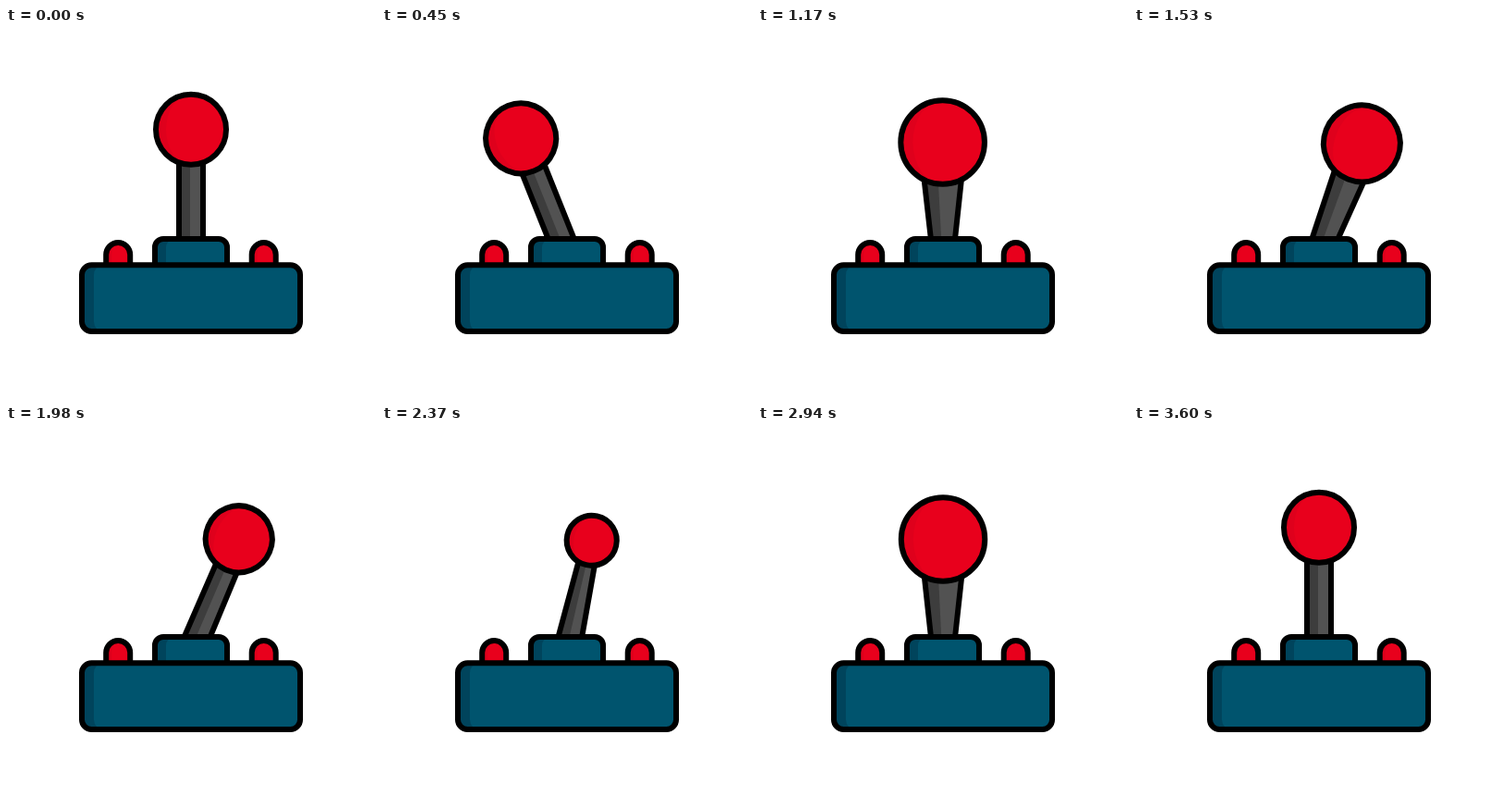
An HTML page without scripts that plays this animation: 400x400 px, repeating every 5630 ms.

```html
<!DOCTYPE html>
<html lang="en">
<head>
<meta charset="utf-8">
<title>Joystick</title>
<style>
  :root {
    --in: cubic-bezier(.47, 0, .745, .715);
    --out: cubic-bezier(.333, .667, .667, 1);
    --sine: cubic-bezier(.37, 0, .63, 1);
  }
  html, body { margin: 0; width: 100%; height: 100%; overflow: hidden; background: #fff; }
  svg { display: block; width: 100%; height: 100%; }

  .line { fill: none; stroke: #000; stroke-width: 6; stroke-linejoin: round; vector-effect: non-scaling-stroke; }
  .red { fill: #e8001c; }
  .red-dark { fill: #df001c; }
  .blue { fill: #00546e; }
  .blue-dark { fill: #00445c; }
  .grey { fill: #525252; }
  .grey-dark { fill: #3d3d3d; }

  .lever, .ball, .rod, .rod-shade {
    animation: 5630ms var(--sine) infinite;
    transform-origin: 0 0;
  }
  .lever { animation-name: tilt; }
  .ball { animation-name: reach, zoom; }
  .rod { animation-name: rod; }
  .rod-shade { animation-name: rod-shade; }

  /* left, sweep to the right, then settle upright */
  @keyframes tilt {
    0% { rotate: 0deg; }
    10.12% { rotate: -24.3deg; }
    10.66% { rotate: -24.3deg; animation-timing-function: var(--in); }
    22.08% { rotate: 0deg; animation-timing-function: var(--out); }
    30.91%, 31.97% { rotate: 24.5deg; }
    52.58%, 100% { rotate: 0deg; }
  }
  /* depth: near, level, far, near, level */
  @keyframes reach {
    0%, 10.66%, 32.3%, 47.96%, 63.94%, 100% { translate: 0 -134px; }
    21.6%, 53.29% { translate: 0 -120px; }
    42.63% { translate: 0 -122.8px; }
  }
  @keyframes zoom {
    0%, 10.66%, 32.3%, 63.94%, 100% { scale: 1; }
    21.6%, 53.29% { scale: 1.195; }
    42.63% { scale: .71; animation-timing-function: var(--in); }
    47.96% { scale: 1; animation-timing-function: var(--out); }
  }
  @keyframes rod {
    0%, 10.66%, 32.3%, 63.94%, 100% { d: path("M-13 0L-13 -118L13 -118L13 0Z"); }
    21.6%, 53.29% { d: path("M-11.3 0L-24.5 -118L24.5 -118L11.3 0Z"); }
    42.63% { d: path("M-13.2 0L-8 -118L8 -118L13.2 0Z"); animation-timing-function: var(--in); }
    47.96% { d: path("M-13 0L-13 -118L13 -118L13 0Z"); animation-timing-function: var(--out); }
  }
  @keyframes rod-shade {
    0%, 10.66%, 32.3%, 63.94%, 100% { d: path("M-13 0L-13 -118L-1 -118L-1 0Z"); }
    21.6%, 53.29% { d: path("M-11.3 0L-24.5 -118L-7 -118L-1 0Z"); }
    42.63% { d: path("M-13.2 0L-8 -118L0 -118L-1 0Z"); animation-timing-function: var(--in); }
    47.96% { d: path("M-13 0L-13 -118L-1 -118L-1 0Z"); animation-timing-function: var(--out); }
  }
</style>
</head>
<body>
<svg viewBox="0 0 400 400">
  <defs>
    <g id="button">
      <path class="red" d="M-13 256V245a13 13 0 0 1 26 0V256Z"/>
      <path class="red-dark" d="M-13 256V245A13 13 0 0 1 0 232Q-7 236 -7 245V256Z"/>
      <path class="line" d="M-13 256V245a13 13 0 0 1 26 0V256"/>
    </g>
  </defs>

  <g transform="translate(200 243.7)">
    <g class="lever">
      <path class="rod grey" d="M-13 0L-13 -118L13 -118L13 0Z"/>
      <path class="rod-shade grey-dark" d="M-13 0L-13 -118L-1 -118L-1 0Z"/>
      <path class="rod line" d="M-13 0L-13 -118L13 -118L13 0Z"/>
      <g class="ball">
        <circle class="red" r="38"/>
        <path class="red-dark" d="M0 -38A38 38 0 0 0 0 38A27 38 0 0 1 0 -38Z"/>
        <circle class="line" r="38"/>
      </g>
    </g>
  </g>

  <use href="#button" x="121.2"/>
  <use href="#button" x="278.7"/>

  <rect class="blue-dark" x="161" y="228" width="78" height="36" rx="9"/>
  <rect class="blue" x="173" y="228" width="66" height="36" rx="9"/>
  <rect class="line" x="161" y="228" width="78" height="36" rx="9"/>

  <rect class="blue-dark" x="82" y="256.2" width="236" height="71.8" rx="10.5"/>
  <rect class="blue" x="95" y="256.2" width="223" height="71.8" rx="10.5"/>
  <rect class="line" x="82" y="256.2" width="236" height="71.8" rx="10.5"/>
</svg>
</body>
</html>
```
